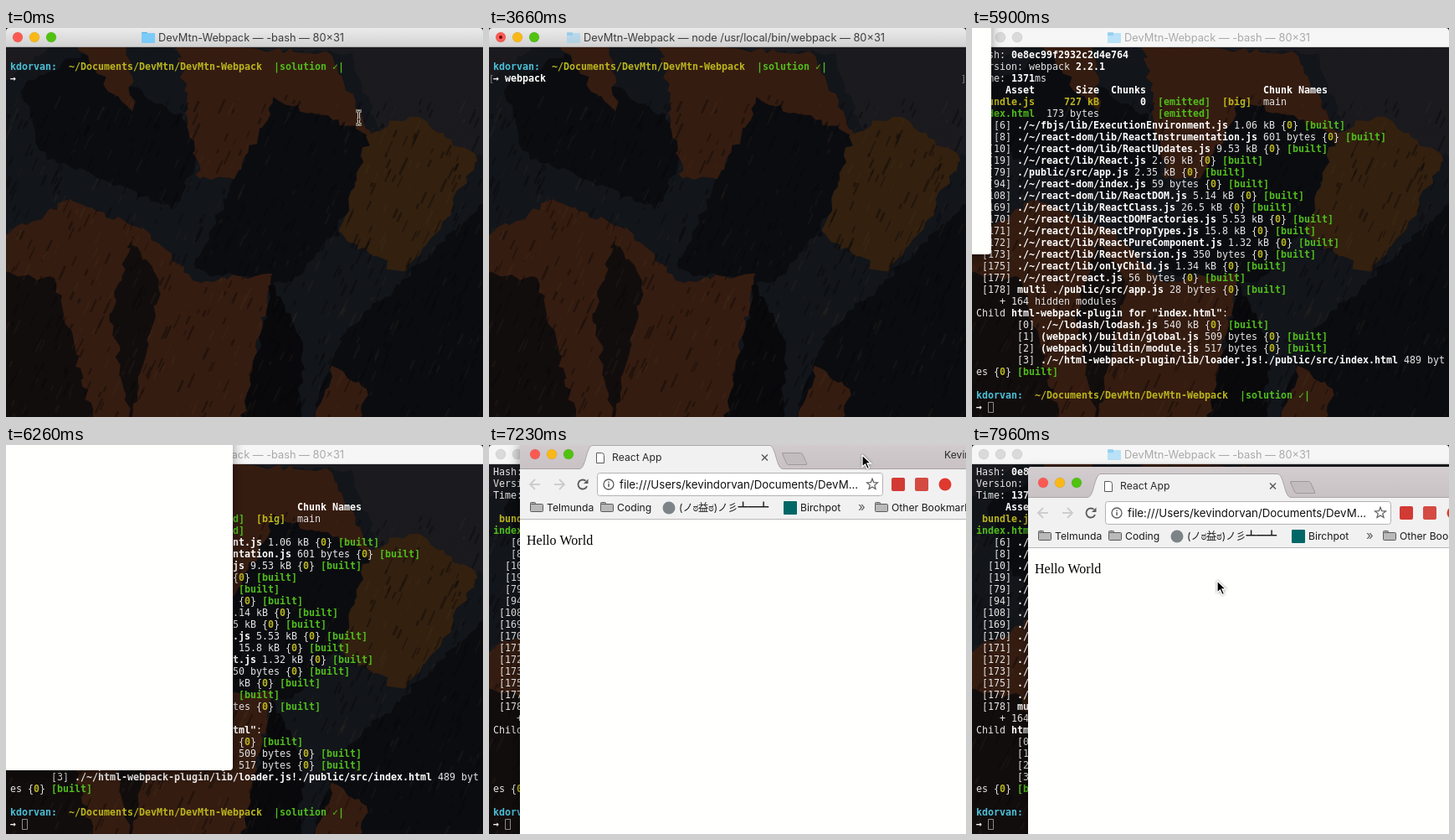
An HTML page with a canvas for the animation above (8000 ms loop, 570 by 464 pixels).

```html
<!DOCTYPE html>
<html lang="en">
<head>
<meta charset="utf-8">
<title>Terminal build</title>
<style>
html, body { margin: 0; width: 570px; height: 464px; overflow: hidden; background: #111; }
canvas { display: block; }
</style>
</head>
<body>
<canvas id="stage" width="570" height="464"></canvas>
<script>
const W = 570, H = 464, LOOP = 8000;
const COL = 7, ROW = 14, ROWS = 31;
const ctx = document.getElementById('stage').getContext('2d');
const MONO = '11.63px "DejaVu Sans Mono", monospace';
const UI = 'Inter, "Noto Sans CJK JP", "Noto Sans CJK", sans-serif';
const LABEL = '12.2px ' + UI;
const COLORS = { w: '#e4e4e4', W: '#ffffff', y: '#b9b51c', g: '#50bd1c', c: '#4bbfd6' };
const GREY = '#5b5b5b';

// ---------- helpers ----------
function text(str, x, y, font, color) {
  ctx.font = font;
  ctx.fillStyle = color;
  ctx.fillText(str, x, y);
}

function paint(c, fill, stroke, width = 1) {
  if (fill) { c.fillStyle = fill; c.fill(); }
  if (stroke) { c.strokeStyle = stroke; c.lineWidth = width; c.stroke(); }
}

function rect(x, y, w, h, fill) {
  ctx.fillStyle = fill;
  ctx.fillRect(x, y, w, h);
}

function box(x, y, w, h, r, ...style) {
  ctx.beginPath();
  ctx.roundRect(x, y, w, h, r);
  paint(ctx, ...style);
}

function disc(x, y, r, ...style) {
  ctx.beginPath();
  ctx.arc(x, y, r, 0, Math.PI * 2);
  paint(ctx, ...style);
}

function path(c, pts, ...style) {
  c.beginPath();
  for (let i = 0; i < pts.length; i += 2) c.lineTo(pts[i], pts[i + 1]);
  paint(c, ...style);
}

function fade(c, y0, y1, a, b) {
  const g = c.createLinearGradient(0, y0, 0, y1);
  g.addColorStop(0, a);
  g.addColorStop(1, b);
  return g;
}

const mix = (a, b, u) => a + (b - a) * u;

// Smooth curve through keys of [time, x, y]
function track(keys, t) {
  const n = keys.length - 1;
  if (t >= keys[n][0]) return keys[n].slice(1);
  let i = 0;
  while (t >= keys[i + 1][0]) i++;
  const a = keys[i], b = keys[i + 1], span = b[0] - a[0], u = (t - a[0]) / span;
  const slope = (k, d) => k === 0 || k === n ? 0 :
    (keys[k + 1][d] - keys[k - 1][d]) / (keys[k + 1][0] - keys[k - 1][0]);
  return [1, 2].map(d => mix(a[d], b[d], u * u * (3 - 2 * u)) +
    span * u * (1 - u) * ((1 - u) * slope(i, d) - u * slope(i + 1, d)));
}

// ---------- wallpaper ----------
function paintWall() {
  const cv = document.createElement('canvas');
  cv.width = W;
  cv.height = H;
  const c = cv.getContext('2d');
  let seed = 11;
  const rnd = () => (seed = (seed * 16807) % 2147483647) / 2147483647;

  // Flat shape with roughened edges
  function rock(fill, ...pts) {
    const out = [], n = pts.length;
    for (let i = 0; i < n; i += 2) {
      const x = pts[i], y = pts[i + 1], x2 = pts[(i + 2) % n], y2 = pts[(i + 3) % n];
      for (let u = 0; u < 1; u += 7 / Math.hypot(x2 - x, y2 - y)) {
        out.push(mix(x, x2, u) + (rnd() - .5) * 8, mix(y, y2, u) + (rnd() - .5) * 8);
      }
    }
    path(c, out, fill);
  }

  const slate = '#12151a', night = '#0b0c10', rust = '#351c10';
  c.fillStyle = fade(c, 22, 200, '#1b1a1f', '#19191e');
  c.fillRect(0, 0, W, H);
  rock(slate, -9, 70, 60, 18, 410, 30, 450, 130, 580, 155, 580, 474, -9, 474);
  rock(night, 20, 70, 90, 30, 245, 130, 200, 215, 40, 150);
  rock(night, 320, 75, 440, 125, 395, 245, 335, 305, 225, 290);
  rock(night, 580, 200, 580, 474, 360, 474, 400, 370);
  rock(rust, 85, 18, 145, 18, 152, 98, 128, 78);
  rock(rust, 205, 18, 385, 30, 440, 130, 322, 85, 272, 182, 230, 178);
  rock('#33200f', 435, 125, 484, 104, 565, 155, 515, 245, 470, 292, 398, 245);
  rock(rust, -9, 252, 78, 204, 165, 240, 225, 302, 318, 292, 285, 474, -9, 474);
  rock('#120d0d', -9, 290, 60, 300, 105, 474, -9, 474);
  rock('#120d0d', 150, 250, 185, 300, 150, 474, 125, 340);
  rock('#09090c', 318, 305, 355, 378, 350, 474, 280, 474);
  rock(rust, 392, 405, 432, 430, 420, 474, 368, 474);

  for (let i = 0; i < 900; i++) {
    const x = rnd() * W, y = 80 + rnd() * H, len = 4 + rnd() * 14;
    const tone = i % 3 ? 'rgba(8,8,11,.4)' : 'rgba(90,70,50,.12)';
    path(c, [x, y, x - len * .45, y + len], null, tone, 1 + rnd() * 2);
  }
  return cv;
}
const wall = paintWall();

// ---------- terminal content: each line is a list of [style, text] ----------
const built = [['w', ' {'], ['y', '0'], ['w', '} '], ['g', '[built]']];
const mod = (id, file, size, pad = 6) =>
  [['w', `[${id}] `.padStart(pad + 1)], ['W', file], ['w', ' ' + size], ...built];
const prompt = [['c', 'kdorvan:  '], ['y', '~/Documents/DevMtn/DevMtn-Webpack  '], ['g', '|solution ✓|']];

const output = [
  [['w', 'Hash: '], ['W', '0e8ec99f2932c2d4e764']],
  [['w', 'Version: webpack '], ['W', '2.2.1']],
  [['w', 'Time: '], ['W', '1371'], ['w', 'ms']],
  [['W', '     Asset       Size  Chunks' + ' '.repeat(20) + 'Chunk Names']],
  [['y', ' bundle.js     727 kB'], ['W', '       0  '], ['g', '[emitted]'], ['y', '  [big]'], ['w', '  main']],
  [['g', 'index.html'], ['w', '  173 bytes' + ' '.repeat(10)], ['g', '[emitted]']],
  mod(6, './~/fbjs/lib/ExecutionEnvironment.js', '1.06 kB'),
  mod(8, './~/react-dom/lib/ReactInstrumentation.js', '601 bytes'),
  mod(10, './~/react-dom/lib/ReactUpdates.js', '9.53 kB'),
  mod(19, './~/react/lib/React.js', '2.69 kB'),
  mod(79, './public/src/app.js', '2.35 kB'),
  mod(94, './~/react-dom/index.js', '59 bytes'),
  mod(108, './~/react-dom/lib/ReactDOM.js', '5.14 kB'),
  mod(169, './~/react/lib/ReactClass.js', '26.5 kB'),
  mod(170, './~/react/lib/ReactDOMFactories.js', '5.53 kB'),
  mod(171, './~/react/lib/ReactPropTypes.js', '15.8 kB'),
  mod(172, './~/react/lib/ReactPureComponent.js', '1.32 kB'),
  mod(173, './~/react/lib/ReactVersion.js', '350 bytes'),
  mod(175, './~/react/lib/onlyChild.js', '1.34 kB'),
  mod(177, './~/react/react.js', '56 bytes'),
  mod(178, 'multi ./public/src/app.js', '28 bytes'),
  [['w', '    + 164 hidden modules']],
  [['w', 'Child '], ['W', 'html-webpack-plugin for "index.html"'], ['w', ':']],
  mod(0, './~/lodash/lodash.js', '540 kB', 10),
  mod(1, '(webpack)/buildin/global.js', '509 bytes', 10),
  mod(2, '(webpack)/buildin/module.js', '517 bytes', 10),
  [['w', '       [3] '], ['W', './~/html-webpack-plugin/lib/loader.js!./public/src/index.html'], ['w', ' 489 byt']],
  [['w', 'es'], ...built]
];

const keyTimes = [700, 1000, 1560, 1860, 2060, 2260, 2430];
const ENTER = 2700, BUSY = 2800, PRINT = 4740, DONE = 4820, READY = 4900, BLUR = 5660;

function cursorOn(t) {
  const solid = (t >= keyTimes[0] && t < 3160) || t >= PRINT;
  return solid || (t + 840) % 1000 < 500;
}

function drawLine(line, row) {
  let x = 5;
  for (const [style, str] of line) {
    text(str, x, 36 + row * ROW, (style === 'w' ? '' : 'bold ') + MONO, COLORS[style]);
    x += str.length * COL;
  }
}

function drawTerminal(t) {
  ctx.drawImage(wall, 0, 0);
  const typed = keyTimes.filter(k => t >= k).length;
  const lines = [[], prompt, [['W', '→ ' + 'webpack'.slice(0, typed)]]];
  if (t >= PRINT) lines.push(...output);
  if (t >= READY) lines.push([], prompt, [['W', '→ ']]);
  else if (t >= ENTER) lines.push([]);

  const scroll = Math.max(0, lines.length - ROWS);
  lines.slice(scroll).forEach(drawLine);

  if (t >= ENTER && t < READY) {
    const y = 64 - scroll * ROW, font = '10px "DejaVu Sans Mono", monospace';
    text('[', 0, y, font, '#8b8b8b');
    text(']', 564, y, font, '#8b8b8b');
  }

  const last = lines[lines.length - 1].map(part => part[1]).join('');
  const x = 5 + last.length * COL, y = 24 + (lines.length - scroll) * ROW;
  if (t >= BLUR) box(x + .5, y - 11.5, 6, 12, 0, null, '#8c8c8c');
  else if (cursorOn(t)) rect(x, y, COL, 1, '#b5b5b5');
  drawTitleBar(t < BLUR, t >= BUSY && t < DONE);
}

function drawTitleBar(active, busy) {
  rect(0, 0, W, 5, '#151519');
  box(0, 0, W, 23, [4, 4, 0, 0], active ? fade(ctx, 0, 22, '#ebebeb', '#d2d2d2') : '#f6f6f6');
  rect(0, 22, W, 1, active ? '#adadad' : '#d4d4d4');
  lights(14, 11, active);
  if (busy) disc(14, 11, 2, '#6b0d0a');

  const title = 'DevMtn-Webpack — ' + (busy ? 'node /usr/local/bin/webpack' : '-bash') + ' — 80×31';
  const font = '12.8px ' + UI;
  ctx.font = font;
  const x = Math.round(283.5 - (ctx.measureText(title).width + 20) / 2);
  ctx.globalAlpha = busy ? .4 : active ? 1 : .5;
  box(x, 5, 7, 4, 1, '#55b1e4');
  box(x, 6, 16, 12, 1, '#7bcbf8');
  ctx.globalAlpha = 1;
  text(title, x + 20, 16, font, active ? '#3d3d3d' : '#a9a9a9');
}

function lights(x, y, active) {
  ['#fb5a53', '#fab816', '#50c20f'].forEach((color, i) =>
    disc(x + i * 20, y, 6, active ? color : '#dadada', 'rgba(0,0,0,.1)', .7));
}

// ---------- browser ----------
const BW = 554, BH = 500;

function bookmark(x, name) {
  box(x + .5, 76.5, 6, 4, 1, '#b9b9b9', GREY);
  box(x + .5, 78.5, 15, 9, 1, '#b9b9b9', GREY);
  text(name, x + 20, 87, LABEL, '#1b1b1b');
}

function arrow(x, y, dir) {
  path(ctx, [x - 6 * dir, y, x + 6 * dir, y], null, '#cbcbcb', 1.8);
  path(ctx, [x, y - 6, x + 6 * dir, y, x, y + 6], null, '#cbcbcb', 1.8);
}

function drawTabs() {
  box(0, 0, BW, 37, [5, 5, 0, 0], fade(ctx, 0, 36, '#d3cdcf', '#c9c2c5'));
  rect(0, 36, BW, 60, '#f2f1f2');
  const l = 71, r = 314, top = 8.5, base = 36.5;
  ctx.beginPath();
  ctx.moveTo(0, base);
  ctx.lineTo(l, base);
  ctx.bezierCurveTo(l + 8, base, l + 8, top, l + 16, top);
  ctx.lineTo(r - 16, top);
  ctx.bezierCurveTo(r - 8, top, r - 8, base, r, base);
  ctx.lineTo(BW, base);
  paint(ctx, '#f2f1f2', '#a9a3a5');

  ctx.save();
  ctx.transform(1, 0, .45, 1, 313, 17.5);
  box(0, 0, 24, 14, 2, '#c3bcbf', '#9f999b');
  ctx.restore();

  lights(18, 19, true);
  box(91.5, 17.5, 9, 12, [0, 3, 0, 0], '#fff', GREY);
  text('React App', 110, 27, LABEL, '#2a2a2a');
  for (const s of [-3.5, 3.5]) path(ctx, [292.5 - s, 19.5, 292.5 + s, 26.5], null, GREY, 1.5);
  text('Kevin', 507, 24, LABEL, '#2a2a2a');
}

function drawToolbar() {
  const mid = 55;
  arrow(18, mid, -1);
  arrow(47, mid, 1);
  ctx.beginPath();
  ctx.arc(75, mid, 5.5, .4, 5.4);
  paint(ctx, null, GREY, 1.8);
  path(ctx, [81.5, 48.5, 81.5, 54, 76, 54], GREY);

  box(92.5, 41.5, 341, 27, 3, '#fff', '#b4b2b3');
  disc(106, mid, 6, null, GREY, 1.3);
  rect(105.3, 54, 1.5, 4, GREY);
  rect(105.3, 51.6, 1.5, 1.5, GREY);
  text('file:///Users/kevindorvan/Documents/DevM...', 119, 60, '13.3px ' + UI, '#111');

  ctx.beginPath();
  for (let i = 0; i < 10; i++) {
    const r = i % 2 ? 2.9 : 6.8, a = i * Math.PI / 5 - Math.PI / 2;
    ctx.lineTo(421 + r * Math.cos(a), mid + r * Math.sin(a));
  }
  ctx.closePath();
  paint(ctx, null, GREY, 1.2);
  box(444, 47, 16, 16, 2, '#d23a34');
  box(472, 47, 16, 16, 2, '#d44b42');
  disc(508, mid, 7.5, '#e0392f');
  for (const dy of [-5, 0, 5]) disc(536, mid + dy, 1.5, GREY);
}

function drawBookmarks() {
  bookmark(12, 'Telmunda');
  bookmark(96, 'Coding');
  disc(178, 83, 7.5, '#7d8488');
  text('(ノಠ益ಠ)ノ彡┻━┻', 190, 87, LABEL, '#1b1b1b');
  box(315, 75, 16, 16, 1, '#066');
  text('Birchpot', 335, 87, LABEL, '#1b1b1b');
  text('»', 404, 87, '15px ' + UI, GREY);
  bookmark(424, 'Other Bookmarks');
  rect(0, 96, BW, 1, '#b9b6b8');
}

function drawBrowser(left, top) {
  ctx.save();
  ctx.translate(left, top);
  ctx.save();
  ctx.shadowColor = 'rgba(0,0,0,.4)';
  ctx.shadowBlur = 14;
  ctx.shadowOffsetY = 5;
  box(0, 0, BW, BH, 4, '#fffffe');
  ctx.restore();
  drawTabs();
  drawToolbar();
  drawBookmarks();
  text('Hello World', 8, 127, '16px "Liberation Serif", serif', '#000');
  ctx.restore();
}

// ---------- pointers ----------
function beam(x, y) {
  for (const [width, color] of [[3, '#d8d2c4'], [1, '#161616']]) {
    for (const s of [-1, 1]) {
      path(ctx, [x + 3.5 * s, y - 8, x + s, y - 8, x, y - 6, x, y + 6, x + s, y + 8, x + 3.5 * s, y + 8], null, color, width);
    }
    path(ctx, [x - 2, y + 2, x + 2, y + 2], null, color, width);
  }
}

function pointer(x, y) {
  ctx.save();
  ctx.translate(x, y);
  ctx.shadowColor = 'rgba(0,0,0,.35)';
  ctx.shadowBlur = 3;
  path(ctx, [0, 0, 0, 14, 3.5, 11, 6, 16.5, 8.5, 15.5, 6, 10, 10.5, 10, 0, 0], '#000', '#fff', 1.3);
  ctx.restore();
}

// ---------- timeline ----------
const drag = [[5700, -590, -262], [5900, -532, -230], [6600, -75, -20], [7230, 37, -8], [7580, 67, 26]];
const GRAB = [409, 20], REST = [293, 162];

function render(t) {
  ctx.clearRect(0, 0, W, H);
  drawTerminal(t);
  if (t < 730) beam(421.5, 107);
  if (t < drag[0][0]) return;
  const at = track(drag, t).map(Math.round);
  drawBrowser(...at);
  const u = Math.min(1, Math.max(0, (t - 7620) / 340));
  pointer(...at.map((v, i) => mix(v + GRAB[i], REST[i], u * u * (3 - 2 * u))));
}

const start = performance.now();
function tick(now) {
  render(Math.max(0, now - start) % LOOP);
  requestAnimationFrame(tick);
}
render(0);
requestAnimationFrame(tick);
</script>
</body>
</html>
```
